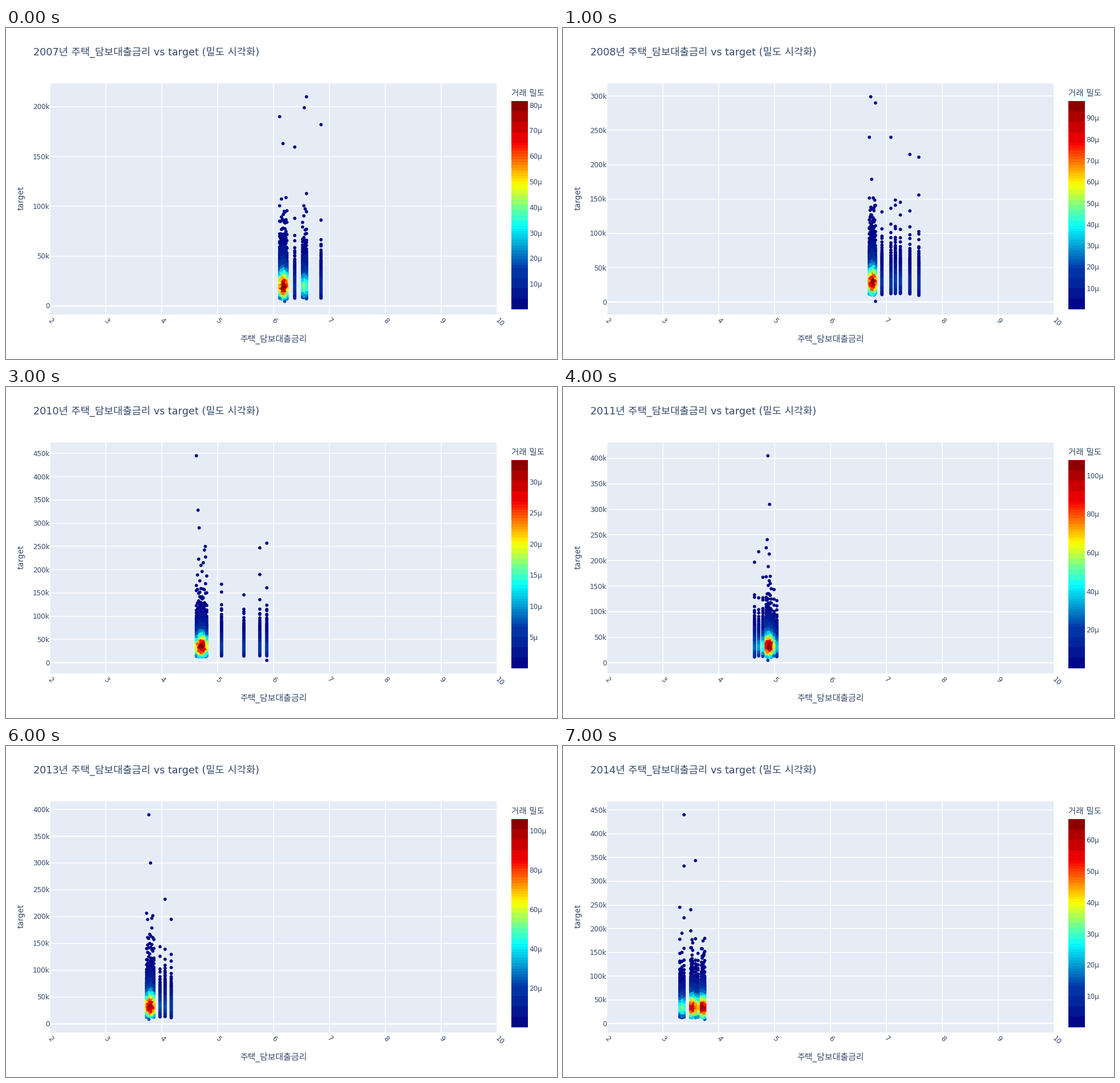
Recreate the animation shown at these times as a matplotlib script. Size 966 by 580 pixels, loop 8 s.

```python
import numpy as np
import matplotlib.pyplot as plt
from matplotlib.animation import FuncAnimation
from matplotlib.collections import LineCollection
from matplotlib.colors import LinearSegmentedColormap
from matplotlib.patches import Rectangle

plt.rcParams["font.family"] = ["DejaVu Sans", "Noto Sans CJK JP"]

W, H, DPI = 966, 580, 64
PT = 72 / DPI                       # points per pixel
LEFT, RIGHT, TOP, BOTTOM = 77, 861, 97, 502
DATA_TOP, DATA_BOTTOM = 120.5, 479  # rows of the highest and lowest point
BAR_X, BAR_W, BAR_TOP, BAR_BOTTOM = 886, 28.5, 128, 492.5
INK, PANEL = "#34486a", "#e5ecf6"
BANDWIDTH = 0.05                    # density kernel along the rate axis

JET = LinearSegmentedColormap.from_list("jet6", [
    (0, 0, 131 / 255), (0, 60 / 255, 170 / 255), (5 / 255, 1, 1),
    (1, 1, 0), (250 / 255, 0, 0), (128 / 255, 0, 0)])
BANDS = (4, 15, 8, 15, 4)           # colour steps in each fifth of the scale
EDGES = np.concatenate([np.linspace(i / 5, (i + 1) / 5, n, endpoint=False)
                        for i, n in enumerate(BANDS)] + [[1.0]])
COLORS = JET((EDGES[:-1] + EDGES[1:]) / 2)


def banded(v):
    i = np.searchsorted(EDGES, v, side="right") - 1
    return COLORS[np.clip(i, 0, len(COLORS) - 1)]


def x_px(rate):
    return LEFT + (RIGHT - LEFT) * (np.asarray(rate) - 2) / 8


def rate_density(rate, rates):
    return np.exp(-0.5 * ((rate - rates) / BANDWIDTH) ** 2).sum()


def make_year(year, peak, mode, clusters, extremes):
    """clusters: (first rate, last rate, columns); extremes: (rate, price in k)."""
    rng = np.random.default_rng(year)
    rates = np.concatenate([np.linspace(*c) for c in clusters])
    weights = np.array([rate_density(r, rates) for r in rates])
    weights /= weights.max()
    ends = np.array(extremes)
    low, high = ends[:, 1].min(), ends[:, 1].max()
    scale = (DATA_BOTTOM - DATA_TOP) / (high - low)
    zero = DATA_BOTTOM + low * scale

    parts = [ends]
    for rate, w in zip(rates, weights):
        solid = mode * (2.2 + 0.5 * w) * rng.uniform(0.9, 1.1)
        body = np.arange(mode * rng.uniform(0.34, 0.44), solid, 1.3 / scale)
        u = (np.arange(13) + rng.random(13)) / 13
        tail = solid * (1 - u) ** -0.27
        price = np.concatenate([body, tail[tail < 0.6 * high]])
        parts.append(np.column_stack([np.full(len(price), rate), price]))
    rate, price = rng.permutation(np.concatenate(parts)).T

    d = (price - mode) / mode
    shape = np.where(d < 0, np.exp(-0.5 * (d / 0.45) ** 2), (1 + (d / 0.87) ** 2) ** -1.5)
    density = np.interp(rate, rates, weights) * shape
    return dict(year=year, zero=zero, scale=scale, peak=peak,
                points=np.column_stack([x_px(rate), zero - price * scale]),
                colors=banded(density))


def single(rate):
    return rate, rate, 1


YEARS = [
    make_year(2007, 81.6, 19.5,
              [(6.11, 6.24, 9), single(6.38), (6.52, 6.59, 4), single(6.85)],
              [(6.2, 4.5), (6.11, 190), (6.17, 163), (6.38, 159.5),
               (6.55, 199), (6.59, 210), (6.85, 182)]),
    make_year(2008, 98, 28.5,
              [(6.695, 6.805, 9), *map(single, (6.92, 7.08, 7.16, 7.25, 7.42, 7.58))],
              [(6.805, 1), (6.72, 299), (6.805, 290), (6.695, 240),
               (7.08, 240), (7.42, 215), (7.58, 211)]),
    make_year(2009, 50.5, 33,
              [(5.25, 5.295, 5), (5.38, 5.455, 4), single(5.63), single(5.77),
               (5.87, 5.9, 2)],
              [(5.295, 6), (5.295, 300), (5.295, 275), (5.43, 260),
               (5.63, 218.5), (5.77, 315), (5.77, 252), (5.9, 229)]),
    make_year(2010, 33.5, 34,
              [(4.62, 4.805, 10), *map(single, (5.07, 5.47, 5.755, 5.88))],
              [(5.88, 5), (4.62, 445), (4.65, 328), (4.67, 290),
               (4.78, 250), (5.755, 247), (5.88, 257)]),
    make_year(2011, 108, 32,
              [(4.64, 4.79, 3), (4.85, 4.94, 6), (4.99, 5.04, 2)],
              [(4.88, 5), (4.88, 405), (4.91, 310)]),
    make_year(2012, 31.7, 30,
              [(4.16, 4.29, 4), *map(single, (4.41, 4.645, 4.765, 4.85)),
               (4.94, 5.06, 4)],
              [(4.23, 7), (4.195, 245), (4.16, 233), (4.41, 235),
               (4.645, 220), (4.94, 352.5), (4.94, 275), (5.06, 216)]),
    make_year(2013, 106, 32,
              [(3.73, 3.86, 8), *map(single, (3.97, 4.06, 4.17))],
              [(3.77, 8), (3.77, 390), (3.8, 300)]),
    make_year(2014, 66.7, 33.5,
              [(3.305, 3.38, 3), (3.5, 3.535, 4), single(3.585), single(3.63),
               (3.69, 3.75, 5)],
              [(3.75, 9), (3.38, 440), (3.38, 332), (3.585, 343.5),
               (3.305, 245), (3.5, 240)]),
]

fig = plt.figure(figsize=(W / DPI, H / DPI), dpi=DPI, facecolor="white")
ax = fig.add_axes([0, 0, 1, 1])
ax.set(xlim=(0, W), ylim=(H, 0))
ax.axis("off")


def label(x, y, text, size, **kw):
    kw.setdefault("va", "baseline")
    return ax.text(x, y, text, fontsize=size * PT, color=INK, **kw)


ax.add_patch(Rectangle((LEFT, TOP), RIGHT - LEFT, BOTTOM - TOP, color=PANEL, lw=0))
for tick in range(2, 11):
    x = x_px(tick)
    ax.plot([x, x], [TOP, BOTTOM], color="white", lw=1.6 * PT, zorder=1.5)
    shift = 4 if tick == 10 else 1.5
    label(x + shift, 511.5 + shift, str(tick), 12, rotation=-45, ha="center", va="center")

levels = BAR_BOTTOM + (BAR_TOP - BAR_BOTTOM) * EDGES
for y0, y1, color in zip(levels, levels[1:], COLORS):
    ax.add_patch(Rectangle((BAR_X, y0), BAR_W, y1 - y0, facecolor=color,
                           lw=0, antialiased=False))

label(469, 550, "주택_담보대출금리", 14.9, ha="center")
label(30.5, 298, "target", 13.7, ha="center", rotation=90, rotation_mode="anchor")
label(BAR_X, 119.5, "거래 밀도", 14.5)

title = label(48, 48, "", 17.6)
grid = ax.add_collection(LineCollection([], colors="white", zorder=1.6))
dots = ax.scatter([], [], s=(5.8 * PT) ** 2, linewidths=0, zorder=3)
y_labels = [label(76.5, 0, "", 12, ha="right") for _ in range(10)]
bar_labels = [label(917.3, 0, "", 12) for _ in range(10)]


def place(texts, items):
    for t in texts:
        t.set_text("")
    for t, (y, s) in zip(texts, items):
        t.set_text(s)
        t.set_y(y + 4.5)


def update(i):
    d = YEARS[i]
    title.set_text(f"{d['year']}년 주택_담보대출금리 vs target (밀도 시각화)")
    ticks = range(0, int((d["zero"] - TOP) / d["scale"]), 50)
    rows = [d["zero"] - k * d["scale"] for k in ticks]
    grid.set_segments([[(LEFT, y), (RIGHT, y)] for y in rows])
    grid.set_linewidths([2.4 * PT] + [1.6 * PT] * (len(rows) - 1))
    place(y_labels, [(y, f"{k}k" if k else "0") for y, k in zip(rows, ticks)])

    peak = d["peak"]
    step = next(s for s in (5, 10, 20) if peak / s < 10)
    unit = (BAR_BOTTOM + 1 - BAR_TOP) / peak
    place(bar_labels, [(BAR_BOTTOM + 1 - v * unit, f"{v}µ")
                       for v in range(step, int(peak) + 1, step)])
    dots.set_offsets(d["points"])
    dots.set_facecolors(d["colors"])
    return [title, grid, dots, *y_labels, *bar_labels]


anim = FuncAnimation(fig, update, frames=len(YEARS), interval=1000,
                     repeat=True, repeat_delay=0, blit=False)
plt.show()
```
